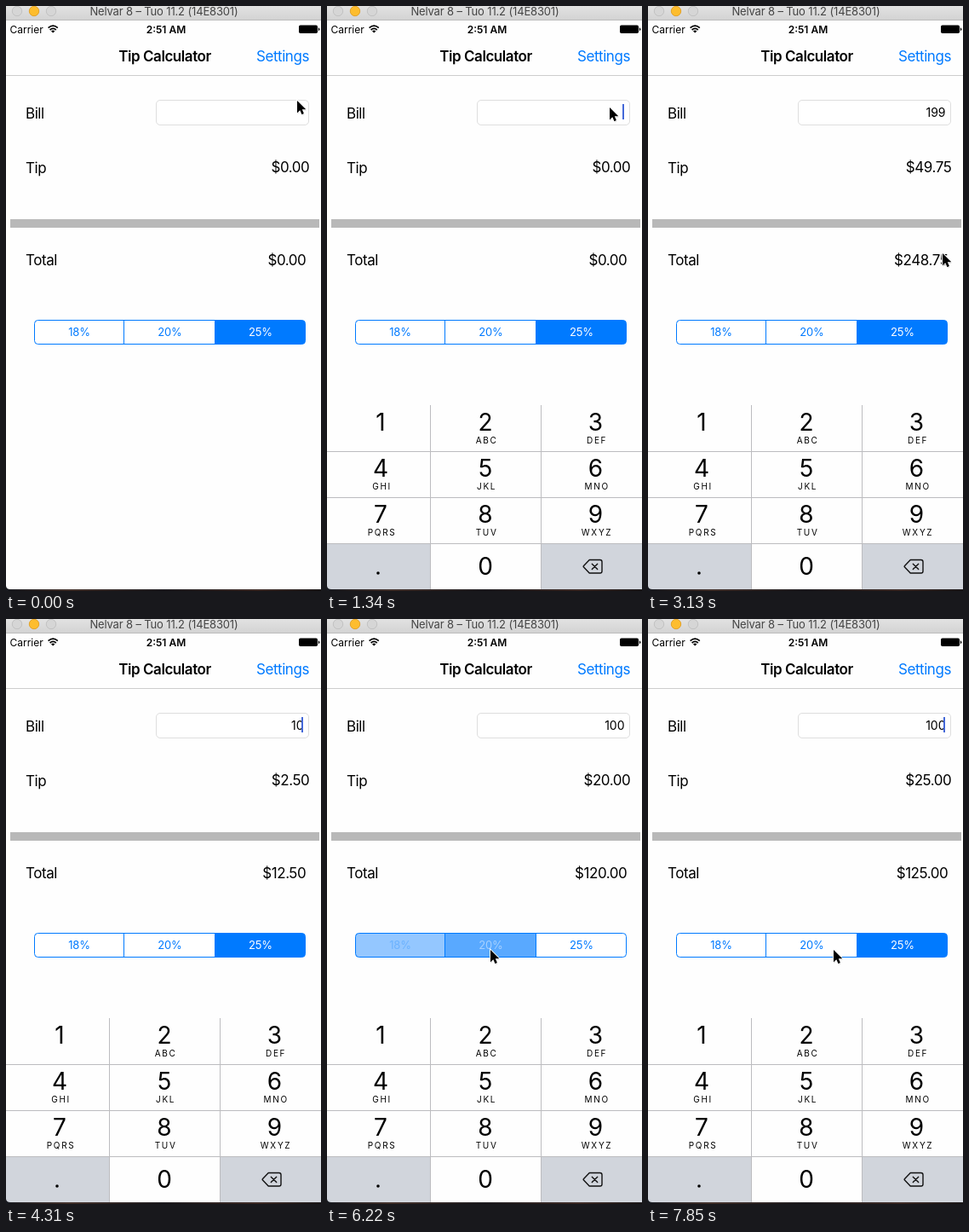
Recreate the animation shown at these times as an HTML page. Size 370x686 px, loop 8000 ms.

```html
<!DOCTYPE html>
<html lang="en">
<head>
<meta charset="utf-8">
<title>Tip Calculator</title>
<style>
  html, body { margin: 0; width: 100%; height: 100%; overflow: hidden; background: #fefefe; }
  svg { display: block; width: 370px; height: 686px; }
  text { font-family: Inter, Roboto, "Liberation Sans", sans-serif; fill: #000; }
  .body { font-size: 17px; letter-spacing: -.45px; }
  .end { text-anchor: end; }
  .mid { text-anchor: middle; }
  .digit { font-size: 28px; text-anchor: middle; }
  .letters { font-size: 10px; letter-spacing: 1.7px; text-anchor: middle; }
  .seg { font-size: 13px; letter-spacing: -.2px; text-anchor: middle; }
</style>
</head>
<body>
<svg viewBox="0 0 370 686" xmlns="http://www.w3.org/2000/svg">
  <defs>
    <linearGradient id="bar" x2="0" y2="1">
      <stop offset="0" stop-color="#e2e2e2"/><stop offset="1" stop-color="#d2d2d2"/>
    </linearGradient>
    <linearGradient id="desk">
      <stop offset="0" stop-color="#17191f"/><stop offset=".2" stop-color="#42302a"/>
      <stop offset=".5" stop-color="#1c1a1e"/><stop offset=".8" stop-color="#3d2a25"/>
      <stop offset="1" stop-color="#1a1718"/>
    </linearGradient>
    <clipPath id="segClip"><rect x="33.5" y="368.5" width="318" height="28" rx="4"/></clipPath>
  </defs>
  <rect width="370" height="686" fill="#fefefe"/>

  <!-- window title bar -->
  <rect width="370" height="17" fill="url(#bar)"/>
  <path d="M0 16.5H370" stroke="#bcbcbc"/>
  <g fill="#d6d6d6" stroke="#c2c2c2">
    <circle cx="13" cy="6" r="5.7"/>
    <circle cx="33" cy="6" r="5.7" fill="#fdbd2e" stroke="#e2a32b"/>
    <circle cx="53" cy="6" r="5.7"/>
  </g>
  <text class="mid" x="185.5" y="11" font-size="13" letter-spacing="-.15" style="fill:#444">Nelvar 8 – Tuo 11.2 (14E8301)</text>

  <!-- status bar -->
  <text x="4.5" y="31.5" font-size="12">Carrier</text>
  <g fill="none" stroke="#000" stroke-width="1.7">
    <path d="M49.6 25.7Q55.2 20.6 60.8 25.7M51.6 28Q55.2 24.8 58.8 28"/>
    <path d="M53 29.4Q55.2 27.5 57.4 29.4L55.2 31.6Z" fill="#000" stroke="none"/>
  </g>
  <text class="mid" x="188" y="31.5" font-size="12" font-weight="600">2:51 AM</text>
  <rect x="344" y="22.5" width="22" height="9.5" rx="1.8"/>
  <path d="M366.8 25.3q1.6 .4 1.6 2t-1.6 2z"/>

  <!-- navigation -->
  <text class="body mid" x="186.5" y="65" font-weight="600">Tip Calculator</text>
  <text class="body" x="294" y="65" style="fill:#007aff">Settings</text>
  <path d="M0 81.5H370" stroke="#cdcdcd"/>

  <!-- form -->
  <text class="body" x="23" y="131.5">Bill</text>
  <text class="body" x="23" y="195.5">Tip</text>
  <text class="body" x="23" y="303.5">Total</text>
  <rect x="176.5" y="110.5" width="179" height="29" rx="4.5" fill="#fff" stroke="#dedede"/>
  <text id="bill" class="end" x="349.5" y="130" font-size="14"></text>
  <rect id="caret" x="347" y="115" width="2" height="18" fill="#4468d8"/>
  <text id="tip" class="body end" x="356.3" y="194.5"></text>
  <text id="total" class="body end" x="352.3" y="303.5"></text>
  <rect x="5" y="250" width="363" height="10" fill="#b8b8b8"/>

  <g id="segs" clip-path="url(#segClip)"></g>
  <g fill="none" stroke="#007aff">
    <rect x="33.5" y="368.5" width="318" height="28" rx="4"/>
    <path d="M138.5 369V396M245.5 369V396"/>
  </g>
  <g id="segLabels"></g>

  <g id="keys">
    <rect y="468" width="370" height="216" fill="#fefefe"/>
    <path d="M0 630.5H121.5V684H0ZM251.5 630.5H370V684H251.5Z" fill="#d1d5dc"/>
    <path d="M0 522.5H370M0 576.5H370M0 630.5H370M121.5 468V684M251.5 468V684" stroke="#bcbcbf" fill="none"/>
    <circle cx="60" cy="665" r="1.8"/>
    <g fill="none" stroke="#111" stroke-width="1.4" stroke-linejoin="round" stroke-linecap="round">
      <path d="M308.2 649.5H320.8Q323 649.5 323 651.7V662.8Q323 665 320.8 665H308.2L301.3 657.8Q300.9 657.2 301.3 656.7Z"/>
      <path d="M311.3 654.2L317.7 660.6M317.7 654.2L311.3 660.6"/>
    </g>
  </g>

  <path d="M0 680Q.5 684 5 684H370V686H0Z" fill="url(#desk)"/>

  <g id="cursor">
    <path d="M1 1V15.4L4.3 12.3L6.5 17.2L8.9 16.1L6.8 11.3H11.3Z" fill="#000" opacity=".2" transform="translate(.5 1.3)"/>
    <path d="M1 1V15.4L4.3 12.3L6.5 17.2L8.9 16.1L6.8 11.3H11.3Z" stroke="#fff" stroke-width="1.8" paint-order="stroke"/>
  </g>
</svg>
<script>
const LOOP = 8000, TICKS = 54;
const $ = id => document.getElementById(id);

function add(parent, tag, attrs, text = '') {
  const el = document.createElementNS('http://www.w3.org/2000/svg', tag);
  for (const k in attrs) el.setAttribute(k, attrs[k]);
  el.textContent = text;
  parent.appendChild(el);
  return el;
}

// keypad
const letters = ['', 'ABC', 'DEF', 'GHI', 'JKL', 'MNO', 'PQRS', 'TUV', 'WXYZ'];
const cols = [63, 186, 315.5];
letters.forEach((word, i) => {
  const x = cols[i % 3], y = 498 + 54 * Math.floor(i / 3);
  add($('keys'), 'text', { class: 'digit', x, y }, i + 1);
  add($('keys'), 'text', { class: 'letters', x: x + 1.6, y: y + 15.3 }, word);
});
add($('keys'), 'text', { class: 'digit', x: 186, y: 667 }, '0');

// segmented control
const edges = [33, 138.5, 245.5, 352];
const segs = ['18%', '20%', '25%'].map((label, i) => ({
  fill: add($('segs'), 'rect', { x: edges[i], y: 368, width: edges[i + 1] - edges[i], height: 29 }),
  label: add($('segLabels'), 'text', { class: 'seg', x: [86, 192.5, 299][i], y: 387 }, label)
}));

// Each track holds [tick, value] steps; a value lasts until the next step.
const bills = [[0, ''], [12, '1'], [14, '19'], [15, '199'], [23, '19'], [24, '1'], [25, ''],
  [28, '1'], [29, '10'], [30, '100']];
const rates = [[0, .25], [36, .18], [42, .2], [48, .25]];
const shades = [[0, [0, 0, 1]], [35, [.12, 0, 1]], [36, [.22, 0, .93]], [37, [1, 0, 0]],
  [41, [1, .15, 0]], [42, [.42, .65, 0]], [43, [0, 1, 0]],
  [47, [0, 1, .15]], [48, [0, .8, .35]], [49, [0, 0, 1]]];
const rise = [[0, 216], [6, 150], [7, 52], [8, 8], [9, 0]];
const blinkStart = [[0, 99], [7, 7], [12, 12], [15, 15], [23, 23], [25, 25], [28, 28], [30, 30]];
const pointer = [[0, [341, 110]], [4, [331, 118]], [12, null],
  [18, [333, 150]], [19, [338, 212]], [20, [343, 270]], [21, [345, 289]], [22, [344, 294]], [23, null],
  [32, [302, 312]], [33, [205, 380]], [34, [112, 404]], [35, [82, 384]], [36, [79, 376]],
  [39, [110, 380]], [40, [165, 386]], [41, [191, 387]],
  [44, [215, 386]], [45, [268, 385]], [46, [303, 384]], [47, [307, 384]],
  [50, [295, 385]], [51, [262, 386]], [52, [232, 387]], [53, [217, 387]]];

const at = (track, tick) => track.filter(step => step[0] <= tick).pop()[1];
const blue = [0, 122, 255];
const tint = a => `rgb(${blue.map(c => Math.round(c + (255 - c) * a))})`;
const money = v => '$' + v.toFixed(2);

function draw(time) {
  const tick = Math.min(TICKS - 1, Math.floor((time % LOOP + 3) * TICKS / LOOP));
  const text = at(bills, tick), bill = Number(text), tip = bill * at(rates, tick);
  $('bill').textContent = text;
  $('tip').textContent = money(tip);
  $('total').textContent = money(bill + tip);

  const idle = tick - at(blinkStart, tick);
  $('caret').setAttribute('opacity', idle >= 0 && idle % 7 < 3 ? 1 : 0);

  at(shades, tick).forEach((a, i) => {
    segs[i].fill.setAttribute('fill', tint(1 - a));
    segs[i].label.style.fill = tint(a);
  });

  $('keys').setAttribute('transform', `translate(0 ${at(rise, tick)})`);

  const p = at(pointer, tick);
  $('cursor').setAttribute('visibility', p ? 'visible' : 'hidden');
  if (p) $('cursor').setAttribute('transform', `translate(${p})`);
}

const start = performance.now();
function loop() {
  draw(performance.now() - start);
  requestAnimationFrame(loop);
}
loop();
</script>
</body>
</html>
```
